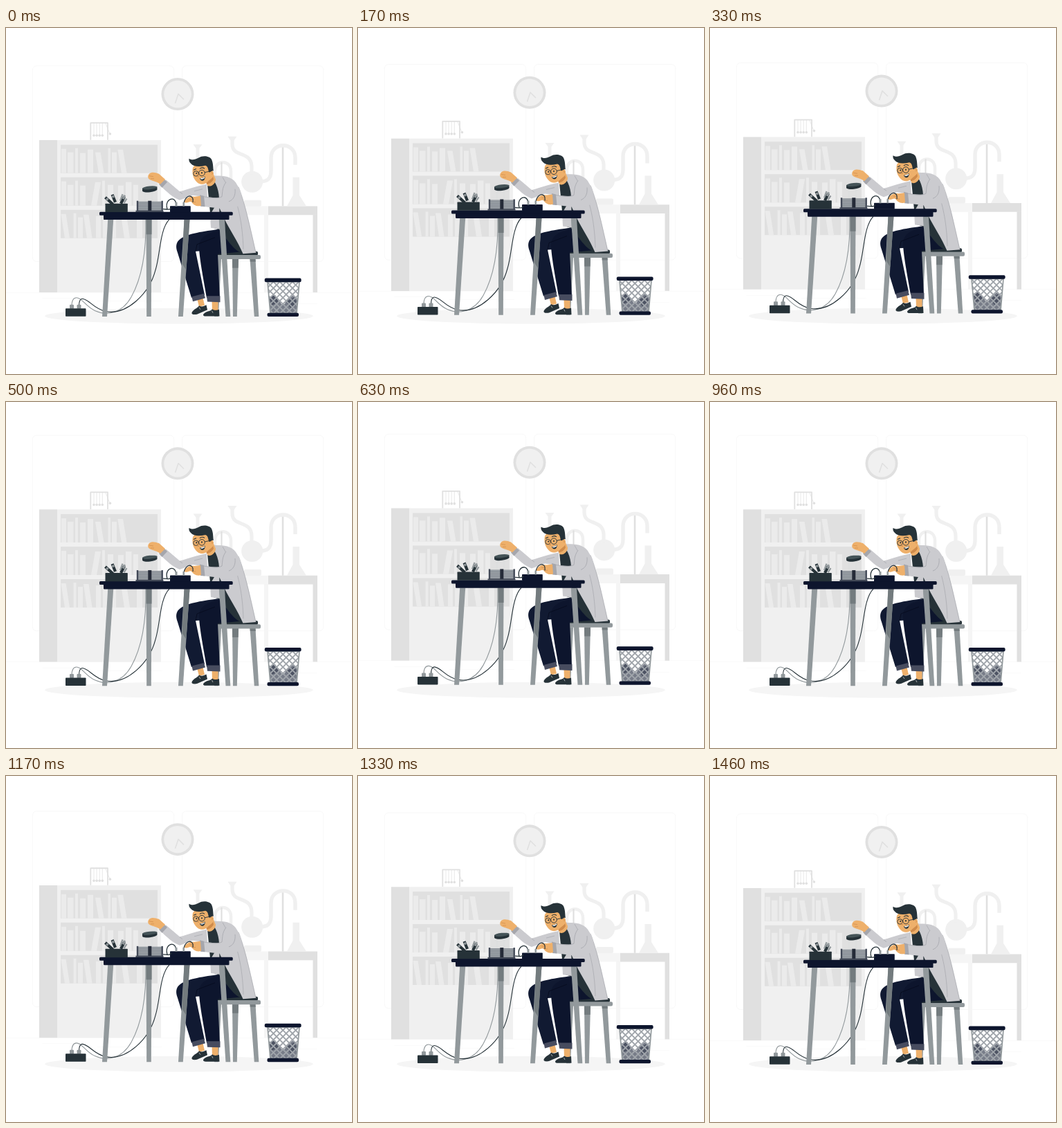
An HTML page with a canvas for the animation above (1500 ms loop, 500 by 500 pixels).

```html
<!DOCTYPE html>
<html lang="en">
<head>
<meta charset="utf-8">
<title>Lab experiment</title>
<style>
html, body { margin: 0; width: 100%; height: 100%; overflow: hidden; background: #fff; }
canvas { display: block; width: 100vw; height: 100vh; }
</style>
</head>
<body>
<canvas id="stage" width="500" height="500"></canvas>
<script>
const ctx = document.getElementById('stage').getContext('2d');
const LOOP = 1500, STEPS = 36, LIFT = 10;
const NAVY = '#0d152d', DARK = '#263238', STEEL = '#92999c', SHADE = '#737b7e';
const SKIN = '#eeb06b', COAT = '#cbcbcf', FOLD = '#a5a6ac';
const G1 = '#e0e0e0', G2 = '#ebebeb', G3 = '#f0f0f0', G4 = '#f5f5f5';

function fill(color, d) {
  ctx.fillStyle = color;
  ctx.fill(new Path2D(d));
}
function line(color, width, d) {
  ctx.strokeStyle = color;
  ctx.lineWidth = width;
  ctx.stroke(new Path2D(d));
}
function box(color, x, y, w, h, r = 0) {
  ctx.fillStyle = color;
  ctx.beginPath();
  ctx.roundRect(x, y, w, h, r);
  ctx.fill();
}
function oval(color, x, y, rx, ry = rx, turn = 0) {
  ctx.fillStyle = color;
  ctx.beginPath();
  ctx.ellipse(x, y, rx, ry, turn, 0, 7);
  ctx.fill();
}
function ring(color, width, x, y, r) {
  ctx.strokeStyle = color;
  ctx.lineWidth = width;
  ctx.beginPath();
  ctx.arc(x, y, r, 0, 7);
  ctx.stroke();
}

function drawRoom() {
  ctx.strokeStyle = G2;
  ctx.lineWidth = 0.35;
  for (const x of [38.4, 254.6]) {
    ctx.beginPath();
    ctx.roundRect(x, 55, 204.2, 282.7, 5.7);
    ctx.stroke();
  }
  box(G2, 0, 382.4, 500, 0.25);
  for (const [x, y, w] of [[416.8, 398.5, 33], [396.6, 389.2, 19], [52.5, 390.9, 43], [104.6, 390.9, 6], [131.5, 395.1, 94]])
    box(G2, x, y, w, 0.25);

  oval(G1, 248, 95.8, 23.5);
  oval(G3, 248, 95.8, 19.7);
  line(G1, 1.6, 'M244.5 109L249 95.6L257 103.5');
}

// A book standing on a shelf; lean shifts its top edge sideways.
function book(x, base, w, h, lean = 0) {
  fill(G2, `M${x} ${base}l${lean} ${-h}h${w}l${-lean} ${h}z`);
}

function drawShelf() {
  box(G1, 48, 162.2, 26, 220.2);
  box(G3, 74, 162.2, 150, 220.2);
  for (const y of [169, 216, 263]) box(G1, 79, y, 140, 41);
  for (const base of [210, 257]) {
    book(80, base, 7, 35);
    book(89, base, 8.5, 30);
    book(100, base, 4, 36);
    book(107, base, 8, 29);
  }
  book(118, 210, 8, 34);
  book(134, 210, 7.5, 30, -5);
  book(147.5, 210, 3.5, 36);
  book(153, 210, 7, 30);
  book(167, 210, 7.5, 34, -5.5);
  book(123, 257, 8, 34, 6);
  book(139, 257, 4, 36);
  book(147, 257, 8, 30);
  book(162, 257, 8, 29);
  book(173, 257, 8.5, 34);
  book(184, 257, 7, 30);
  book(85, 304, 7, 35, -5.5);
  book(97.5, 304, 4, 36);
  book(104, 304, 7, 30);
  book(117, 304, 7.5, 34, -5);
  book(130, 304, 7, 32);
  book(140, 304, 8, 30);
  book(154, 304, 5, 35);
  book(171, 304, 8, 34, -5);
  book(189, 304, 8, 30);

  line(G1, 1.8, 'M122.3 162V137.4H147V162');
  for (let i = 0; i < 4; i++) {
    const x = 127 + i * 4.1;
    line(G1, 0.7, `M${x} 137V155`);
    oval(G1, x, 155.5, 1.8);
  }
  line(G1, 0.7, 'M143.5 137L150 153');
  oval(G1, 150.4, 153.3, 1.8);
}

function drawLab() {
  box(G4, 324, 257.7, 55, 12.8);
  box(G4, 373, 270, 6, 112.4);
  box(G1, 379, 257.7, 71, 12.8);
  box(G1, 443.5, 270, 6.5, 112.4);

  line(G1, 2.6, 'M400 171V257.7');
  line(G3, 5.4, 'M364 222C378 223 383 218 383 207V188C383 164 418 164 418 188V198');
  oval(G3, 355.7, 222.5, 15.5);
  line(G3, 5.2, 'M327 160V168C327 188 354 177 355 200V212');
  fill(G3, 'M320.5 157H333.5L329.5 163H324.5z');
  box(G3, 344, 249, 25, 9, 2);
  fill(G3, 'M414.5 216H424V242L434 257.7H406L414.5 242z');
  fill(G3, 'M270.5 168.5H283.5L279.5 174H274.5z');
  line(G3, 5, 'M277 172V200');
  line(G3, 4.5, 'M302 230V207C302 190 325 190 325 207V230');
  line(G1, 2.2, 'M311.5 194V220');
}

function drawBasket() {
  const body = new Path2D('M378 367H424L420 413H382z');
  ctx.save();
  ctx.clip(body);
  fill('#777c88', 'M378 391L386 386L395 395L400 400L407 393L414 387L424 393V413H378z');
  fill('#4d5363', 'M380 389L389 386L394 397L384 401zM405 396L417 389L421 400L411 405z');
  oval('#fff', 400.3, 396.5, 3.3);
  for (let x = 320; x < 480; x += 9.2) {
    line('#a0a5ab', 1.9, `M${x} 365L${x + 50} 415M${x} 415L${x + 50} 365`);
  }
  ctx.restore();
  ctx.strokeStyle = STEEL;
  ctx.lineWidth = 1.7;
  ctx.stroke(body);
  box(NAVY, 373.8, 361.9, 52.8, 5.6, 2);
  box(NAVY, 377.5, 412, 45.5, 5.3, 2);
}

function drawStool() {
  fill(STEEL, 'M304 334H311L307 417.3H301z');
  fill(STEEL, 'M327 334H336L333.8 417.3H328z');
  fill(SHADE, 'M327 334H336L335.6 347H327.2z');
  fill(STEEL, 'M352.5 334H360.5L365.3 417.3H358.8z');
  fill(SHADE, 'M352.5 334H360.5L360.8 338H352.8z');
  box(DARK, 302, 323, 62, 6, 2);
  box(STEEL, 303, 328.2, 65, 6.2, 2);
}

function drawLegs() {
  fill(SKIN, 'M276 391L284 388L287 401L279 403z');
  fill(SKIN, 'M297.5 394H306.5V409H298z');
  fill(DARK, 'M269 410.5C272 406 277 405 279 401.5C283 404 286 402 289.5 400.5L291 407.5L276 414C271 415 267 414 269 410.5z');
  fill(DARK, 'M286 413C290 409 296 410 298 406.5C302 409 304 408 308 407L308.5 416.8H289C285 417 284 415 286 413z');
  line('#fff', 0.6, 'M279 404L281 407M297.5 409L299 412');

  fill('#111a32', 'M308 291C286 294 263 297 252 305C245 310 245 317 248 325L268 390L287 386L274 323L320 320z');
  fill(NAVY, 'M309 292C291 297 280 302 279 315C279 331 285 361 290 390H309L306 327L346 323L337 292z');
  line('#05091b', 0.7, 'M274 323L276 313L302 303');
  fill('#474c5f', 'M268.5 388.5L286 384L288 390.5L270 395.5z');
  fill('#474c5f', 'M290 387.5H309.5V396.5L291 395.8z');
}

function drawTorso() {
  fill(DARK, 'M291 226L306 216L319 240L344 325C334 327 321 309 309 292L297 288z');
  fill(COAT, 'M303 214C316 213 329 216 334 227C340 240 345 255 350 276L361.3 325L342.5 326.5C335 309 323 291 316 277L306 255C312 242 307 228 303 214z');
  fill(COAT, 'M295 270L308 248L309 291L296 289z');
  fill(COAT, 'M301 213.5L313 216L322 230L311 255L308 258C309 241 306 228 299 219z');
  line(FOLD, 0.7, 'M313 216L321 230L315 232L318 239L308 258');
  line(FOLD, 0.7, 'M331 246C337 264 342 287 343 320M336 230C343 247 350 275 361 325');

  fill(COAT, 'M231 219.5L251 236.5C262 234 277 228 290 226L291 245L270 242L251 249C242 246 231 236 223 228z');
  line(FOLD, 0.7, 'M251 237L255 240M272 236L284 233');
  fill(FOLD, 'M228 218L233 223L225.5 231L221 226z');
  fill(SKIN, 'M230 219L221 211C216 209 210 208 207 211C204 214 205 218 208 219.5C213 222 218 222 223 226z');
  line('#c98546', 0.6, 'M207 214L213 215M209 218L214 218');

  fill(COAT, 'M319 222C332 220 340 232 340 245C339 258 333 262 318 262L284 258L282 243C294 245 306 247 312 244C311 234 313 227 319 222z');
  line(FOLD, 0.8, 'M318 223C312 231 313 238 312 244C306 247 298 246 286 244M331 233C332 243 328 249 322 251');
  fill(FOLD, 'M280 241.5L286 243L287.5 258.5L281 258z');
  fill(SKIN, 'M281 243L272 244C265 243 260 246 257 252C261 254 265 251 268 251C270 256 276 259 282 257z');
  line('#c98546', 0.6, 'M265 248L271 248M267 251L274 252');
}

function drawHead() {
  fill(SKIN, 'M288 218L298 207L303 219C303 226 295 231 291 228z');
  fill('#cf8b4b', 'M289 223C294 221 297 218 299 214L300 219C297 224 293 226 290 226z');
  fill(SKIN, 'M270 202C268 211 271 219 277 224C283 228 290 226 294 219C300 218 302 210 298 206L296 196L276 194z');
  fill(DARK, 'M264.5 189C270 192 273 190 278 188C284 184 294 185 297 190C300 197 299 203 300 207C296 205 295 211 293 208C292 204 292 200 288 199C280 201 271 201 267 196C265 194 264 192 264.5 189z');
  ring(DARK, 0.9, 274.5, 210.7, 3.7);
  ring(DARK, 0.9, 283, 209.8, 4.3);
  line(DARK, 0.9, 'M278 210.4H279M287 209L298 206.5');
  line(DARK, 1.1, 'M271 205.5L275 203.8M280 203.7C282 202 285 202 287 203.5');
  oval(DARK, 275.2, 210.2, 0.9, 1.2);
  oval(DARK, 283, 209.5, 0.9, 1.2);
  line('#c98546', 0.8, 'M278 210L276.5 215L279 215.3');
  fill(DARK, 'M280 217.5C283 217.5 285.5 216.5 287.5 214.5C288 218 286.5 221 284 221C282 221 280.5 219.5 280 217.5z');
  fill('#fff', 'M281 217.6C284 217.5 286 216.4 287.2 215.3L287 217C285 218.8 283 219 281.2 218.5z');
  line('#c98546', 0.7, 'M296 209C298 208 299 210 297.5 212');
}

function drawDesk() {
  line(STEEL, 1.1, 'M202 277C203 325 196 362 181 389C167 414 144 416 129 409C115 403 110 390 102 390C96 390 95 396 95 402');
  line(DARK, 1.1, 'M236 277C222 291 223 328 216 350C207 385 174 415 145 410C127 407 119 391 110 391.5C106 392 105.5 397 105.5 402');
  box(STEEL, 92, 400, 6, 6, 1);
  box(STEEL, 102.5, 400, 6, 6, 1);
  box(DARK, 86, 405.5, 29.5, 11.5, 0.8);

  fill(STEEL, 'M147.2 277H155.2L146 417.3H139z');
  fill(STEEL, 'M202.5 277H210.5L209.8 417.3H203.2z');
  fill(SHADE, 'M202.5 277H210.5V298.5H202.6z');
  fill(STEEL, 'M257.5 277H265.5L255.8 417.3H249z');
  fill(SHADE, 'M257.5 277H265.5L260.4 350L254.5 341z');
  fill(STEEL, 'M307.8 277H316L324.3 417.3H317.5z');
  box(NAVY, 135, 266, 192.7, 5, 1.5);
  box(NAVY, 141, 270, 181.5, 7.4, 1.2);
}

function drawTools() {
  line(DARK, 4.2, 'M154.5 255L143.5 245M158 252L153.5 241M166 254L171 244');
  line(STEEL, 3.2, 'M145 246.5L147.5 248.8M154 242.5L155.3 245.5M169.3 247.5L171.6 242');
  line(STEEL, 2.2, 'M165 250L168.5 240.5M170.5 253L174.5 247');
  box(DARK, 143.5, 254, 32.3, 12.3, 0.6);

  box('#858b92', 189, 251, 37, 13.5);
  for (let y = 252.5; y < 264; y += 2.4) line('#b5babf', 0.7, `M190 ${y}H226`);
  box('#424957', 188.8, 250, 2.4, 15);
  box('#252b38', 205.3, 250, 5, 15);
  box('#424957', 224.5, 250, 2.4, 15);
  box('#424957', 187.5, 264, 40, 2.2);
  line('#d9dcde', 0.6, 'M201 238V250M211 238V250');

  oval(DARK, 207.8, 234.5, 10.8, 3, -0.12);
  fill(DARK, 'M197 232L218.4 229.8V233.5L197.1 236z');
  oval('#455458', 207.7, 231.2, 10.7, 2.4, -0.1);

  box(NAVY, 237, 257.5, 29.8, 9, 0.8);
  line(DARK, 1.3, 'M227 262C233 262 237 264 239 260M233 262C230 252 236 246.5 241 247.5C245 248.5 246 253 246 258');
  line(DARK, 1.2, 'M257 258C256 247 264 240 269 245C271 247 270 250 270 252');
  fill(STEEL, 'M244.5 252H247.5V258H244.5zM255.5 252H258V258H255.5z');
}

// The scene rises and falls linearly at 24 steps a second above a fixed shadow.
function render(ms) {
  const step = Math.floor((ms % LOOP) / LOOP * STEPS + 0.1) % STEPS;
  const phase = (step + 0.5) / STEPS;
  const lift = LIFT * (1 - Math.abs(1 - 2 * phase));
  ctx.clearRect(0, 0, 500, 500);
  oval(G4, 250, 416.2, 193.9, 11.3);
  ctx.save();
  ctx.translate(0, -lift);
  ctx.lineCap = 'butt';
  ctx.lineJoin = 'round';
  drawRoom();
  drawShelf();
  drawLab();
  drawBasket();
  drawStool();
  drawLegs();
  drawTorso();
  drawHead();
  drawDesk();
  drawTools();
  ctx.restore();
}

const start = performance.now();
function tick() {
  render(performance.now() - start);
  requestAnimationFrame(tick);
}
tick();
</script>
</body>
</html>
```
